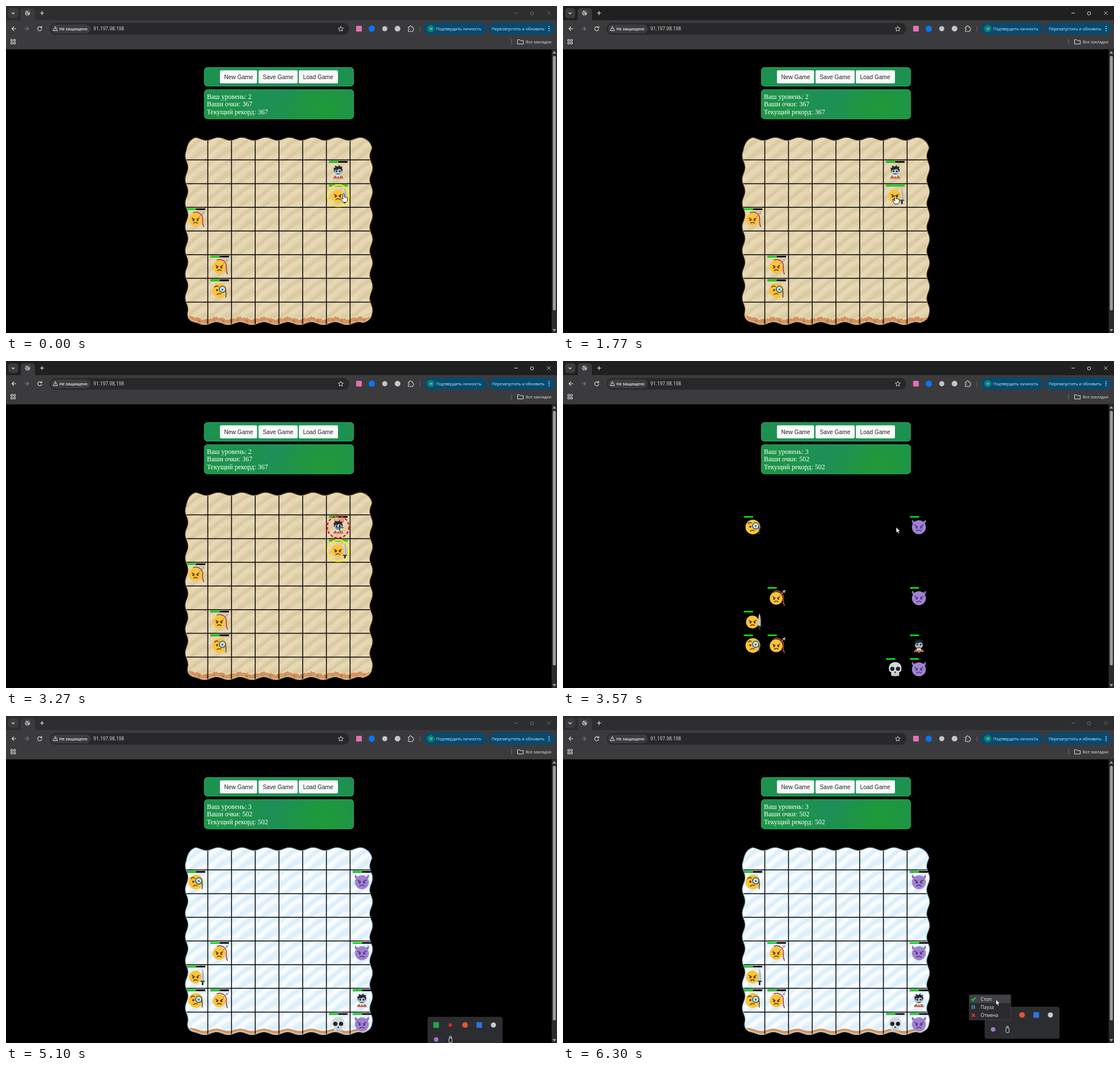
These frames come from a looping animation (971 px wide and 577 px high, 6.33 s). An HTML page with a canvas:

```html
<!DOCTYPE html>
<html lang="ru">
<head>
<meta charset="utf-8">
<style>
html, body { margin: 0; width: 100%; height: 100%; overflow: hidden; background: #000; }
canvas { display: block; }
</style>
</head>
<body>
<canvas id="stage" width="971" height="577"></canvas>
<script>
const LOOP = 6330, CELL = 41.8, LEFT = 313.8, TOP = 229.8, TAU = Math.PI * 2;
const stage = document.getElementById('stage').getContext('2d');
let g = stage;

const UI = '"Open Sans", sans-serif';
const clamp = v => Math.max(0, Math.min(1, v));

function box(x, y, w, h, r, fill, stroke) {
  g.beginPath();
  g.roundRect(x, y, w, h, r);
  if (fill) { g.fillStyle = fill; g.fill(); }
  if (stroke) { g.strokeStyle = stroke; g.lineWidth = 1; g.stroke(); }
}
function disc(x, y, r, fill, stroke, width = 1) {
  g.beginPath();
  g.arc(x, y, r, 0, TAU);
  if (fill) { g.fillStyle = fill; g.fill(); }
  if (stroke) { g.strokeStyle = stroke; g.lineWidth = width; g.stroke(); }
}
function shape(d, fill, stroke, width = 1) {
  const path = new Path2D(d);
  if (fill) { g.fillStyle = fill; g.fill(path); }
  if (stroke) { g.strokeStyle = stroke; g.lineWidth = width; g.stroke(path); }
}
function label(str, x, y, font, color) {
  g.font = font;
  g.fillStyle = color;
  g.fillText(str, x, y);
}
function at(x, y, draw) {
  g.save();
  g.translate(x, y);
  draw();
  g.restore();
}

// ---- Board ----
const wave = (v, crest) => 2.5 * Math.cos((v - crest) / CELL * TAU);

function boardOutline() {
  const path = new Path2D();
  const side = (from, to, point, corner) => {
    const step = Math.sign(to - from);
    for (let v = from; v !== to + step; v += step) {
      const p = point(v);
      if (v !== from) path.lineTo(...p);
      else if (corner) path.quadraticCurveTo(...corner, ...p);
      else path.moveTo(...p);
    }
  };
  side(334, 627, x => [x, 234.8 - wave(x, 374)]);
  side(250, 542, y => [643.3 + wave(y, 286), y], [641, 236]);
  side(629, 332, x => [x, 560 + wave(x, 350)], [644, 555]);
  side(542, 256, y => [318.5 + wave(y, 285), y], [319, 555]);
  path.quadraticCurveTo(321, 236, 334, 234.8 - wave(334, 374));
  path.closePath();
  return path;
}

function makeBoard(theme) {
  const canvas = document.createElement('canvas');
  canvas.width = 971;
  canvas.height = 577;
  g = canvas.getContext('2d');
  const outline = boardOutline();
  g.save();
  g.clip(outline);
  g.fillStyle = theme.base;
  g.fillRect(310, 225, 345, 345);
  for (let i = 0; i < 64; i++) at(LEFT + i % 8 * CELL, TOP + (i >> 3) * CELL, () => {
    g.beginPath();
    g.rect(0, 0, CELL, CELL);
    g.clip();
    shape('M-4 17C8 18 12 3 30-3M-4 39C14 37 17 15 46 10M18 46C27 41 32 36 46 34', null, theme.stripe, 8);
    shape('M-3 28C12 26 17 9 46-2M4 44C20 41 25 25 46 22', null, theme.shade, 2);
    let seed = 7;
    const random = () => (seed = seed * 16807 % 2147483647) / 2147483647;
    g.fillStyle = theme.speck;
    for (let k = 0; k < 26; k++) g.fillRect(random() * CELL, random() * CELL, 1.2, 1);
  });
  // soil along the lower edge
  g.beginPath();
  g.moveTo(310, 570);
  for (let x = 310; x <= 652; x++) {
    const corner = 9 * Math.exp(-Math.min(x - 314, 648 - x) / 7);
    g.lineTo(x, theme.soilTop + wave(x, 350) * .8 - corner + theme.jag * Math.sin(x * .75) * Math.cos(x * .31));
  }
  g.lineTo(652, 570);
  g.fillStyle = '#d29562';
  g.fill();
  g.strokeStyle = theme.soilEdge;
  g.lineWidth = 1.2;
  g.stroke();
  if (theme.jag) for (let x = 324; x < 645; x += CELL / 3)
    shape(`M${x} 553l4 2 2 8h-4z`, '#bb794d');
  g.strokeStyle = theme.rim;
  g.lineWidth = 4;
  g.stroke(outline);
  g.strokeStyle = '#000';
  g.lineWidth = 1.5;
  for (let i = 1; i < 8; i++) {
    const x = LEFT + i * CELL, y = TOP + i * CELL;
    g.beginPath();
    g.moveTo(x, 225); g.lineTo(x, 570);
    g.moveTo(310, y); g.lineTo(655, y);
    g.stroke();
  }
  g.restore();
  g.strokeStyle = theme.edge;
  g.lineWidth = 1.2;
  g.stroke(outline);
  g = stage;
  return canvas;
}

const sand = makeBoard({
  base: '#dfcfa9', stripe: '#e7d8b5', shade: '#d8c59c', speck: '#d3c199',
  soilTop: 550, jag: 2, soilEdge: '#ecdcb0', rim: 'rgba(239,226,184,.6)', edge: '#96754f'
});
const ice = makeBoard({
  base: '#e1f2fd', stripe: '#f8fcff', shade: '#d5ecfa', speck: '#eef8fe',
  soilTop: 553, jag: 0, soilEdge: '#fff', rim: 'rgba(255,255,255,.5)', edge: '#7ba5b0'
});

// ---- Characters, drawn around their cell centre ----
function angryFace() {
  disc(-.8, 1, 11.3, '#fbc437');
  shape('M-7-2L-2 1M6-2L1 1', null, '#5b3a20', 1.7);
  disc(-4.5, 2, 1.6, '#4a3020');
  disc(3.2, 2, 1.6, '#4a3020');
  shape('M-4.5 7.5Q-.6 4 3.4 7.5', null, '#5b3a20', 1.5);
}
const sprites = {
  bow() {
    shape('M-8-10L14 13', null, '#c9b5a5', .6);
    angryFace();
    shape('M-5-11Q1-14 7-10Q12-7 12 0Q11 7 14 14', null, '#b5463c', 1.8);
    shape('M6-4L14-12', null, '#a58772', 1.3);
    shape('M16-14L10-12 14-8Z', '#a9b3b8');
  },
  sword() {
    angryFace();
    shape('M11.5-14Q15-8 14 8H9.5Q9-8 11.5-14Z', '#a6b0b8');
    shape('M11.5-14Q10-8 10 8H11.8Z', '#d9e0e5');
    box(8, 7.5, 8, 2, 1, '#394349');
    box(10.4, 9, 3, 6.5, 1, '#263238');
  },
  mage() {
    disc(0, .5, 13, '#fbc437');
    shape('M-9-5Q-6-9-2-6', null, '#63401f', 1.6);
    disc(-4.5, 0, 1.8, '#4a3020');
    disc(5, -1.5, 5.5, '#c9e6f5', '#4a5d66', 1.7);
    disc(5, -1, 1.8, '#52717f');
    shape('M10.5-1Q12 5 11 13', null, '#394349', 1.4);
    shape('M-5 8Q-1 5 3 7', null, '#63401f', 1.5);
  },
  vampire() {
    shape('M-9 12Q-8 6 0 6Q8 6 9 12Z', '#b66c48');
    shape('M-4 6H4L1 13H-1Z', '#f0f3f5');
    shape('M-1 8H1L2 12H-2Z', '#c8483e');
    disc(0, -1, 7.2, '#aebfca');
    shape('M-7 1L-8-7-5-7-6-11-1-9 3-12 3-9 8-9 6-6 8-5 7 1 5-4 1-5-2-3-5-4Z', '#20272d');
    disc(-3, -1, 1.5, '#1d2529');
    disc(3, -1, 1.5, '#1d2529');
    shape('M-3 4H3', null, '#44535b', 1.3);
  },
  demon() {
    shape('M-9-5Q-15-8-11-13Q-10-8-3-8ZM9-5Q15-8 11-13Q10-8 3-8Z', '#8b6bbd');
    disc(0, .8, 12.3, '#a083cf');
    shape('M-8-3L-2 0M8-3L2 0', null, '#593f89', 1.8);
    disc(-4, 1.5, 2, '#593f89');
    disc(4, 1.5, 2, '#593f89');
    shape('M-4.5 8Q0 4 4.5 8', null, '#593f89', 1.7);
  },
  skull() {
    shape('M-11 0C-13-16 13-16 11 0Q11 5 7 6V12Q0 14-7 12V6Q-11 5-11 0Z', '#d2d8dc');
    disc(-5, 0, 3.6, '#1c2023');
    disc(5, 0, 3.6, '#1c2023');
    shape('M0 4L2 7H-2Z', '#1c2023');
    shape('M-3 9V13M0 9V13M3 9V13', null, '#7d878d', .8);
  }
};
const teams = [
  [['vampire', 6, 1], ['sword', 6, 2, 1], ['bow', 0, 3], ['bow', 1, 5], ['mage', 1, 6]],
  [['mage', 0, 1], ['demon', 7, 1], ['bow', 1, 4], ['demon', 7, 4], ['sword', 0, 5],
   ['mage', 0, 6], ['bow', 1, 6], ['vampire', 7, 6], ['skull', 6, 7], ['demon', 7, 7]]
];
function character([name, col, row, health = .5]) {
  const x = LEFT + col * CELL, y = TOP + row * CELL;
  at(x + 20.8, y + 20.8, sprites[name]);
  box(x + 5, y + 2, 32.3, 2.8, 0, '#000');
  box(x + 5, y + 2, 32.3 * health, 2.8, 0, '#08e313');
}

// ---- Browser window ----
function browser(active) {
  box(0, 0, 971, 30, 0, active ? '#1f2020' : '#2d2e2f');
  box(0, 25, 971, 52, 0, '#3b3b3e');
  box(26, 4, 25, 24, [5, 5, 0, 0], '#3b3b3e');
  box(4, 4, 17.5, 17.5, 5, '#3b3c3d');
  const white = '#e3e3e3';
  shape('M10 11.5L12.5 14 15 11.5M60 12.5H67M63.5 9V16', null, white, 1.2);
  disc(38, 12.5, 4.6, '#a9acae');
  shape('M34 11Q37 12 37 14T39 16.5M38 8.5Q39 11 42 11', null, '#4b4c4f', 1.2);
  const controls = active ? '#eee' : '#747474';
  shape('M896 12.5H902M953.5 9.5L959.5 15.5M959.5 9.5L953.5 15.5', null, controls, .9);
  box(924.5, 10.5, 5, 5, 1, null, controls);

  shape('M18 40H10.5M14 36.5L10.5 40 14 43.5', null, white, 1.1);
  shape('M32.5 40H40M36.5 36.5L40 40 36.5 43.5', null, '#7b7b7d', 1.1);
  shape('M62 37.5A3.6 3.6 0 1 0 63 41M63 35.5V38.5H60', null, white, 1.1);
  box(77, 30, 528, 20.5, 10, '#28282a');
  box(79, 32.5, 70, 15.5, 8, '#3c3c3f');
  shape('M87 36L91 43.5H83ZM87 38.5V41M87 41.8V42.5', null, white, .9);
  label('Не защищено', 94, 42.7, '600 7px ' + UI, '#eee');
  label('91.197.98.198', 154, 43.2, '8.3px ' + UI, white);
  shape('M590 35.8L591.3 38.7 594.5 39 592.1 41.1 592.8 44.3 590 42.6 587.2 44.3 587.9 41.1 585.5 39 588.7 38.7Z', null, white, .9);
  box(617, 35, 10, 10, 1, '#e470b5');
  disc(644.5, 40, 5.5, '#0877f2');
  disc(667.5, 40, 4.5, '#c5c5c7');
  disc(690, 40, 5, '#c5c5c7');
  shape('M709 37H711.3Q711 34.7 713 34.7T714.7 37H717V39.3Q718.8 39.5 718.8 41T717 42.7V45H709V42Q711 41.5 711 40.8T709 39.5Z', null, white, 1);
  box(729, 35.5, 1, 10, 0, '#5c6468');
  box(736, 29.5, 110, 21, 10.5, '#074a70');
  box(850, 29.5, 117, 21, 10.5, '#074a70');
  disc(748.5, 40, 6.5, '#0b806f');
  label('М', 746.4, 42.2, '5.5px ' + UI, '#d7eee9');
  label('Подтвердить личность', 758, 42.6, '7.1px ' + UI, '#d7ecf8');
  label('Перезапустить и обновить', 856, 42.6, '7.1px ' + UI, '#d7ecf8');
  for (const y of [36.5, 40, 43.5]) disc(957, y, .9, '#e5f2f9');

  for (const [x, y] of [[8.5, 59], [13.5, 59], [8.5, 64], [13.5, 64]]) box(x, y, 3, 3, 0, null, white);
  box(890.5, 58, 1, 10, 0, '#6a7175');
  shape('M901.5 59.5H905L906.5 61H911.5V67H901.5Z', null, white, 1);
  label('Все закладки', 916, 65.8, '7.1px ' + UI, white);

  box(0, 76.5, 971, 501, 0, '#000');
  box(961.5, 76.5, 10, 501, 0, '#2b2b2c');
  box(963.7, 88, 5.2, 449, 2.6, '#9e9e9f');
  shape('M966.3 79.5L969.5 84H963ZM966.3 574.5L969.5 570H963Z', '#9e9e9f');
}

function panel(y, h, glow) {
  box(349, y, 264, h, 6, '#1d9150');
  g.save();
  g.clip();
  for (const [x, gy, r, color] of glow) {
    const fill = g.createRadialGradient(x, gy, 0, x, gy, r);
    fill.addColorStop(0, color);
    fill.addColorStop(1, color.slice(0, 7) + '00');
    g.fillStyle = fill;
    g.fillRect(349, y, 264, h);
  }
  g.restore();
  box(349.5, y + .5, 263, h - 1, 6, null, '#2ba35b');
}

function scoreboard(level, score) {
  panel(108, 34, [[481, 125, 90, '#1b8f57aa']]);
  for (const [text, x, w] of [['New Game', 377, 65.5], ['Save Game', 445, 69], ['Load Game', 516, 69]]) {
    box(x, 113.5, w, 23, 2, '#f8f9fa');
    label(text, x + 7.5, 128.7, '10.2px "Liberation Sans", Arial, sans-serif', '#212529');
  }
  panel(147, 52.5, [[485, 150, 60, '#1c8e62aa'], [560, 185, 90, '#1f9a38ff'], [375, 198, 70, '#1f9840aa']]);
  const font = '12px "Liberation Serif", Times, serif';
  label('Ваш уровень: ' + level, 354, 163.7, font, '#fff');
  label('Ваши очки: ' + score, 354, 177.4, font, '#fff');
  label('Текущий рекорд: ' + score, 354, 191.2, font, '#fff');
}

// ---- System tray ----
function tray(y) {
  box(743, y, 132, 56.5, 4, '#2c2d30');
  box(753, y + 9.5, 10, 10, 1, '#21a54a');
  disc(783, y + 14.5, 3.3, '#d3262b');
  disc(809, y + 14.5, 5, '#e5513a');
  box(829, y + 9.5, 10, 10, 1, '#2f73e0');
  disc(859, y + 14.5, 4.5, '#c9cccd');
  disc(758, y + 40, 4, '#a276c6');
  box(780.5, y + 37.5, 5.5, 8, 1, null, '#d8d8d8');
  box(781.7, y + 34.5, 3, 3, 0, null, '#d8d8d8');
}
function menu(hovered) {
  box(716, 492, 73, 44, 0, '#2b2b2e', '#454548');
  if (hovered >= 0) box(717, 493 + hovered * 14, 71, 13.5, 0, '#414146');
  shape('M720 499.5L722.5 502 727 496.5', null, '#27c43d', 2.2);
  shape('M721.2 510.5V517M724.8 510.5V517', null, '#3a9fe0', 2);
  shape('M720.5 525.5L726 531M726 525.5L720.5 531', null, '#d92e36', 2.2);
  ['Стоп', 'Пауза', 'Отмена'].forEach((text, i) =>
    label(text, 736, 502.8 + i * 14.2, '8.3px ' + UI, '#eee'));
}

// ---- Pointer ----
const pointers = {
  hand: () => shape('M-1.3 1Q0-1 1.3 1V6L5 6.7Q7 7.2 7 9Q7 13 4.5 15.5H-1Q-2.5 13-4.8 10Q-5.2 8-3.2 8.6L-1.3 10Z', '#fff', '#000', .9),
  arrow: () => shape('M0 0V10.2L2.3 8.2 4 11.7 5.8 10.9 4.2 7.5H7.2Z', '#fff', '#000', .8),
  cross: () => shape('M-7 0H7M0-7V7', null, '#1c1c1c', 1.1)
};
const track = [
  [0, 595, 331], [530, 590, 338], [670, 590, 338], [700, 585, 336], [1230, 585, 336], [1330, 586, 334],
  [2230, 586, 334], [2400, 588, 302], [2570, 588, 302], [2720, 586, 338], [2800, 586, 338], [3030, 588, 294],
  [3500, 588, 294], [3530, 587, 293], [4230, 587, 293], [4500, 757, 579], [5130, 757, 579],
  [5630, 789, 536], [5870, 789, 536], [6070, 765, 513], [6270, 765, 513], [6300, 763, 500]
];
function pointerAt(t) {
  const i = track.findIndex(key => key[0] > t);
  if (i < 0) return track.at(-1).slice(1);
  const [t0, x0, y0] = track[i - 1], [t1, x1, y1] = track[i];
  const p = (t - t0) / (t1 - t0), k = p * p * (3 - 2 * p);
  return [x0 + (x1 - x0) * k, y0 + (y1 - y0) * k];
}

function draw(t) {
  const second = t >= 3500;
  const selected = t < 1770 || t >= 2760 && !second;
  const [px, py] = pointerAt(t);
  const aiming = selected && py < 313;

  browser(t >= 1770 && t < 5100);
  scoreboard(second ? 3 : 2, second ? 502 : 367);
  g.globalAlpha = second ? clamp((t - 3600) / 270) : 1;
  g.drawImage(second ? ice : sand, 0, 0);
  g.globalAlpha = 1;
  if (t >= 3270 && !second) {
    const p = (t - 3270) / 230;
    g.globalAlpha = .75 * (1 - p);
    label('109', 576, 286 - 10 * p, '13px "Liberation Serif", Times, serif', '#f00');
    g.globalAlpha = 1;
  }
  teams[+second].forEach(character);
  if (selected) disc(585.5, 334.8, 18.9, null, '#fff01a', 2.2);
  if (aiming) {
    g.setLineDash([5, 2.9]);
    disc(585.3, 293, 19.2, null, '#f5141c', 2.5);
    g.setLineDash([]);
  }
  if (t >= 5100) tray(513 + 18 * (1 - clamp((t - 5100) / 130)) ** 2);
  if (t >= 5870) menu(px > 788 ? -1 : Math.max(0, Math.min(2, Math.floor((py - 493) / 14))));
  at(px, py, pointers[second ? 'arrow' : aiming ? 'cross' : 'hand']);
}

function tick() {
  draw(performance.now() % LOOP);
  requestAnimationFrame(tick);
}
tick();
</script>
</body>
</html>
```
